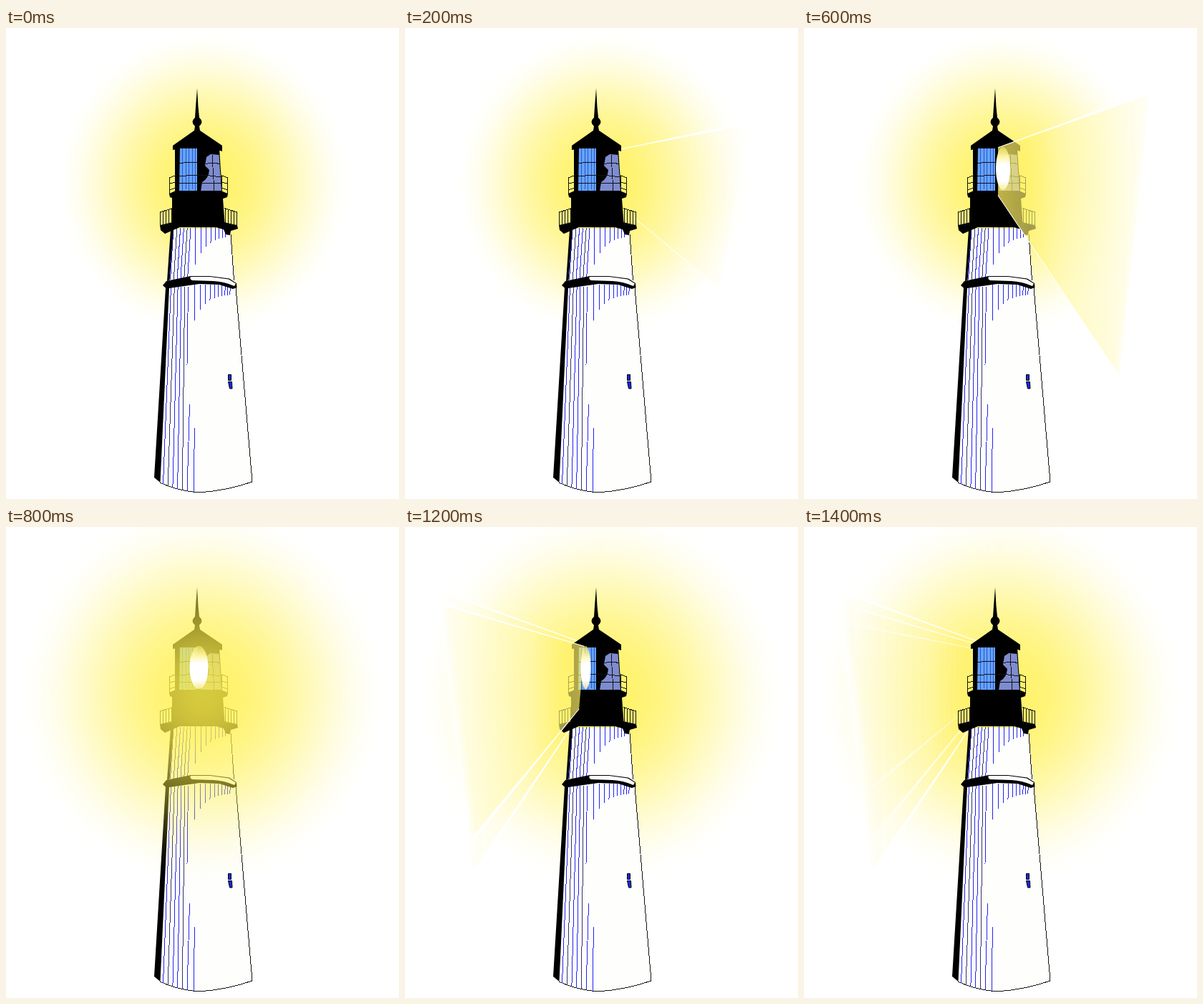
Recreate the animation shown at these times as an HTML page. Size 549 by 657 pixels, loop 1600 ms.

```html
<!DOCTYPE html>
<html lang="en">
<head>
<meta charset="utf-8">
<title>Lighthouse</title>
<style>
  html, body { margin: 0; width: 100%; height: 100%; overflow: hidden; background: #fff; }
  svg { display: block; width: 100%; height: 100%; }
  .thin { fill: none; stroke: #111; stroke-width: 1; shape-rendering: crispEdges; }
</style>
</head>
<body>
<svg viewBox="0 0 549 657">
  <defs>
    <radialGradient id="smallHalo"/>
    <radialGradient id="bigHalo"/>
    <linearGradient id="rayR" gradientUnits="userSpaceOnUse" x1="267" y1="0" x2="490" y2="0">
      <stop offset="0" stop-color="#ffee58" stop-opacity=".76"/>
      <stop offset=".22" stop-color="#fff272" stop-opacity=".64"/>
      <stop offset=".42" stop-color="#fff8ac" stop-opacity=".72"/>
      <stop offset=".7" stop-color="#fffbd0" stop-opacity=".78"/>
      <stop offset="1" stop-color="#fffef6" stop-opacity=".8"/>
    </linearGradient>
    <linearGradient id="rayL" href="#rayR" x2="44"/>
    <linearGradient id="lamp" x1="0" y1="0" x2="0" y2="1">
      <stop offset="0" stop-color="#f8ec70" stop-opacity=".6"/>
      <stop offset=".25" stop-color="#fff7b0"/>
      <stop offset=".4" stop-color="#fff"/>
      <stop offset=".8" stop-color="#fff"/>
      <stop offset="1" stop-color="#fff3a0" stop-opacity=".8"/>
    </linearGradient>
    <filter id="soft" x="-30%" y="-30%" width="160%" height="160%"><feGaussianBlur stdDeviation=".7"/></filter>
    <filter id="blur" x="-50%" y="-10%" width="200%" height="120%"><feGaussianBlur stdDeviation="3"/></filter>
  </defs>

  <ellipse id="glowSmall" cx="276" cy="217" rx="206" ry="214" fill="url(#smallHalo)"/>
  <ellipse id="glowBig" cx="275" cy="236" rx="260" ry="268" fill="url(#bigHalo)"/>
  <g id="back"></g>

  <g id="tower">
    <path d="M231 280L207 627L215 634Q240 646 270 648Q310 645 344 633L321 362L313 280Z" fill="#fefefd"/>
    <path class="thin" d="M314 288L318.500 352M321 362L344 633Q310 645 270 648Q240 646 215 634"/>
    <g id="hatch" class="thin"></g>
    <path d="M230 281L234 280L228.500 352L225 353ZM223 362L228 362L215.500 634L207 627Z"/>

    <path d="M219 359L224 353L258 346H285L312 349.500L322 356L322.500 362L317 364L298 358L270 357L224 363.500Z"/>
    <path d="M258 347H285L311 350.500L321 356.500L319 360Q304 353.500 290 353L260 352Q256 350 258 347Z" fill="#fefefd"/>
    <path d="M310.500 483.500H314.500V491.500H310.500ZM310.500 493.500H315.500L316 503H312.500Z" fill="#1428e8" stroke="#000"/>

    <path d="M267 84L265 110L264 125Q257 131 264 137L263 143L233 164V170L258 167H285L302 172V164L271 143L270 137Q277 131 270 125L268.500 110Z"/>
    <path d="M236 167H298L302 230H236Z"/>
    <path d="M243 168H267V228H242Z" fill="#66a2fa"/>
    <path d="M280 180L286 176L297.500 177L301 228H272L274 215Q283 210 284 198L278 192Z" fill="#7e8ccf"/>
    <g id="panes" class="thin"></g>
    <path class="thin" d="M242 189Q255 186 267 188M279 190Q288 186 299 190M242 207Q271 203 301 208M242 216H302M288 177L291 228"/>

    <path d="M228 231L237 227H300L310 231L309 236L303 238L306 278H232V237L229 236Z"/>
    <path d="M215 275L232 271H305L323 275L324 280L314 283L313 289L307 288L304 281L290 277L270 276L245 277L222 287L216 282Z"/>
    <g id="rails" class="thin">
      <path d="M228.500 233V209L237 205.500V228M228.500 217L237 215M228.500 226L237 223M215 257L233 251.500"/>
    </g>
    <use href="#rails" transform="translate(538) scale(-1 1)"/>
  </g>

  <g id="front"></g>
  <ellipse id="flood" cx="275" cy="234" rx="260" ry="270" fill="url(#bigHalo)"/>
  <g id="lamps"></g>
</svg>
<script>
const STEP = 200, STEPS = 8, MID = 267;
const $ = id => document.getElementById(id);

function add(parent, tag, attrs) {
  const el = document.createElementNS('http://www.w3.org/2000/svg', tag);
  for (const k in attrs) el.setAttribute(k, attrs[k]);
  parent.appendChild(el);
  return el;
}

function line(parent, x1, y1, x2, y2, stroke) {
  add(parent, 'path', { d: `M${x1} ${y1}L${x2} ${y2}`, stroke });
}

// Visible from one step up to another, with hard changes
function show(el, from, to) {
  const keys = [];
  for (let s = 0; s <= STEPS; s++)
    keys.push({ offset: s / STEPS, opacity: +(s >= from && s < to), easing: 'steps(1)' });
  el.animate(keys, { duration: STEP * STEPS, iterations: Infinity });
}

function halo(id, power) {
  for (let r = 0; r <= 1; r += .05)
    add($(id), 'stop', {
      offset: r, 'stop-color': '#fff04a', 'stop-opacity': .84 * (1 - r * r) ** power
    });
  add($(id), 'stop', { offset: 1, 'stop-color': '#fff04a', 'stop-opacity': 0 });
}
halo('smallHalo', 1.75);
halo('bigHalo', 2);

// Shading: long strokes on the left, short ones trailing off to the right
const BLUE = '#2222f4', DARK = '#333366', hatch = $('hatch');
for (let i = 0; i < 6; i++) {
  const ink = i % 3 == 1 ? DARK : BLUE;
  line(hatch, 234 + i * 4.8, 279, 229.5 + i * 4.8, 351, ink);
  line(hatch, 230.5 + i * 4.8, 361, 219.5 + i * 6.7, i < 5 ? 636 + i * 2.2 : 470, ink);
}
line(hatch, 256.5, 525, 253, 646, BLUE);
line(hatch, 263.5, 558, 262, 648, BLUE);
for (let i = 0; i < 10; i++) {
  const dx = 8 * i - .28 * i * i, fade = Math.exp(-dx / 15);
  if (i < 8) line(hatch, 265 + dx, 277, 264.5 + dx, 290 + 40 * fade, BLUE);
  line(hatch, 264 + dx, 358, 263.5 + dx, 371 + 37 * fade, BLUE);
}

for (let x = 247; x < 267; x += 4.5) line($('panes'), x, 168, x - .5, 228, '#2a58c8');
for (let i = 0; i < 5; i++) line($('rails'), 215.5 + i * 4, 257 - i * 1.2, 215.5 + i * 4, 276);

// Straight edge given by heights at two distances from the middle
function edge(side, start, d1, y1, d2, y2) {
  const y = y1 + (y2 - y1) * (start - d1) / (d2 - d1);
  return { x: MID + side * start, y, fx: MID + side * d2, fy: y2 };
}

// A beam opens from 0 to 1; side is 1 for right, -1 for left
function beam(parent, side, open, fill, from, to) {
  const up = edge(side, 34 - 30 * open, 34, 169 - 13 * open, 217, 132 - 42 * open);
  const low = edge(side, 53 - 49 * open, 50, 262 + 40 * open, 173, 364 + 121 * open);
  const g = add(parent, 'g', {});
  add(g, 'path', {
    d: `M${up.x} ${up.y}L${up.fx} ${up.fy}L${low.fx} ${low.fy}L${low.x} ${low.y}Z`,
    fill: `url(#ray${side > 0 ? 'R' : 'L'})`, 'fill-opacity': fill
  });
  add(g, 'path', {
    d: `M${up.fx} ${up.fy}L${low.fx} ${low.fy}`, stroke: '#fff', 'stroke-width': 9,
    opacity: .5, filter: 'url(#blur)'
  });
  for (const e of [up, low])
    add(g, 'path', {
      d: `M${e.x} ${e.y}L${e.fx - 1.4} ${e.fy - 1.6}L${e.fx + 1.4} ${e.fy + 1.6}Z`,
      fill: '#fff', stroke: '#fff', 'stroke-width': .8, filter: 'url(#soft)'
    });
  show(g, from, to);
}

// The beam widens on the right, floods the view, then narrows on the left and leaves traces
for (let i = 0; i < 3; i++) {
  const open = 1 - (1 - i / 2) ** 1.3;
  const layer = i ? $('front') : $('back');
  const fill = i ? 1 : .3;
  beam(layer, 1, open, fill, 1 + i, 2 + i);
  beam(layer, -1, open, fill, 7 - i, 8 - i);
  if (i) beam($('back'), -1, open, .35, 8 - i, STEPS);
}

// The lamp swings across the lantern
for (let s = 2; s <= 6; s++) {
  const p = (s - 4) / 2;
  const lens = add($('lamps'), 'ellipse', {
    cx: 269.500 - 17 * p, cy: 196, rx: 13 - 6 * Math.abs(p), ry: 30,
    fill: 'url(#lamp)', filter: 'url(#soft)'
  });
  show(lens, s, s + 1);
}

show($('glowSmall'), 0, 4);
show($('flood'), 4, 5);
show($('glowBig'), 5, STEPS);
</script>
</body>
</html>
```
